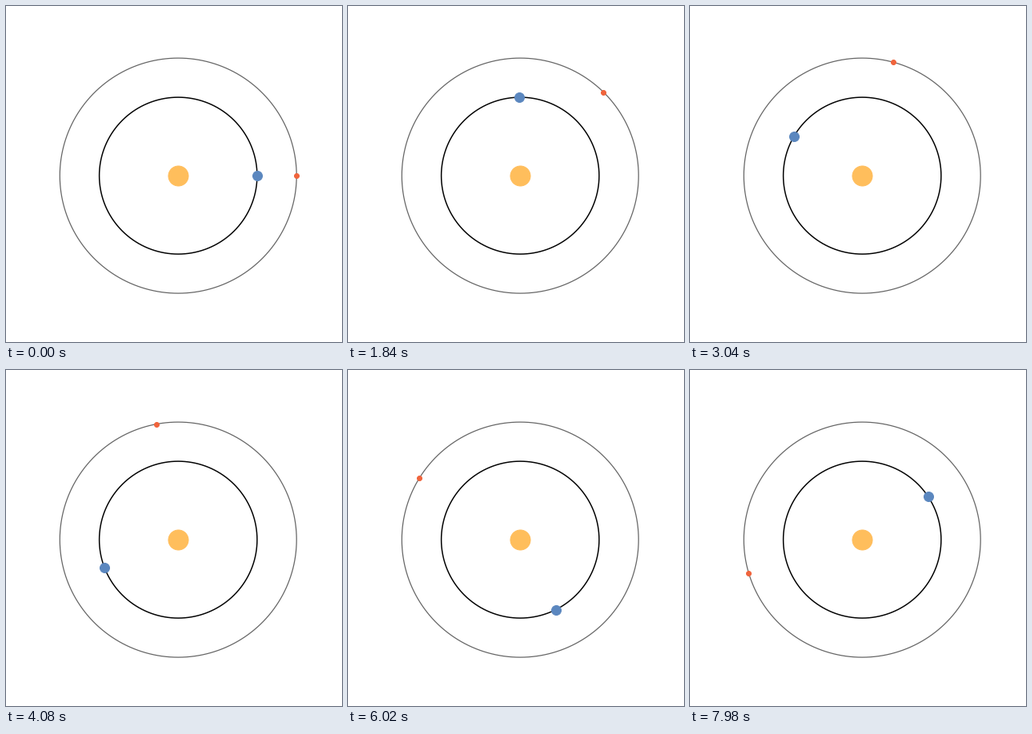
Animation of 420 by 420 pixels, one loop 8 s. Source, as a matplotlib script:

```python
import numpy as np
import matplotlib.pyplot as plt
from matplotlib.animation import FuncAnimation

DPI = 100
PX = 72 / DPI          # one pixel in points
FRAMES = 400
INTERVAL = 20
YEAR = 365.25          # frames per inner revolution

fig = plt.figure(figsize=(4.2, 4.2), dpi=DPI, facecolor="white")
ax = fig.add_axes([0.125, 0.11, 0.775, 0.77])
ax.set_xlim(-1.65, 1.65)
ax.set_ylim(-1.65, 1.65)
ax.axis("off")


def orbit(radius, color, width):
    a = np.linspace(0, 2 * np.pi, 721)
    ax.plot(radius * np.cos(a), radius * np.sin(a), color=color,
            lw=width * PX, solid_capstyle="butt", zorder=1)


def body(x, color, size):
    """Round marker whose full diameter is size pixels."""
    dot, = ax.plot([x], [0], "o", color=color, ms=(size - 1) * PX,
                   mew=PX, zorder=3)
    return dot


orbit(1.0, "black", 1.5)
orbit(1.5, "#666666", 1.25)
body(0, "#ffbe5c", 26)
inner = body(1.0, "#5b87bf", 13)
outer = body(1.5, "#f0643c", 7)


def place(dot, radius, period, day):
    a = 2 * np.pi * day / period
    dot.set_data([radius * np.cos(a)], [radius * np.sin(a)])


def update(day):
    place(inner, 1.0, YEAR, day)
    place(outer, 1.5, 2 * YEAR, day)
    return inner, outer


anim = FuncAnimation(fig, update, frames=FRAMES, interval=INTERVAL,
                     repeat=True, repeat_delay=0, blit=False)
plt.show()
```
